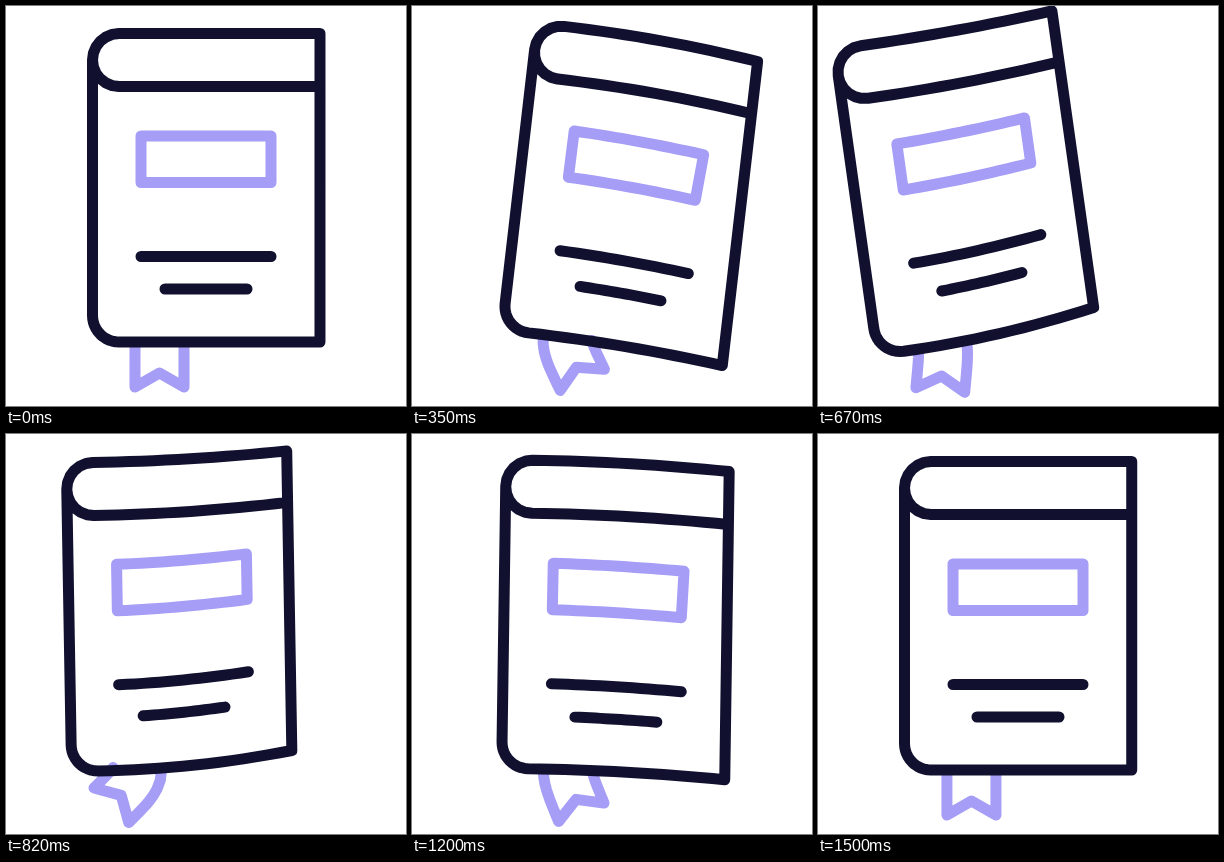
An HTML page for the animation above (1.52 s loop, 400 by 400 pixels).

```html
<!DOCTYPE html>
<html lang="en">
<head>
<meta charset="utf-8">
<title>Swinging book</title>
<style>
  html, body { margin: 0; width: 100%; height: 100%; overflow: hidden; background: #fff; }
  svg { display: block; width: 100%; height: 100%; }
  path { fill: none; stroke-width: 11; stroke-linejoin: round; stroke-linecap: round; }
  .ink { stroke: #11112f; }
  .accent { stroke: #a59df6; }
  #ribbon { stroke-linecap: butt; }
</style>
</head>
<body>
<svg viewBox="0 0 400 400">
  <g id="book">
    <path id="ribbon" class="accent"/>
    <path id="label" class="accent"/>
    <path id="lines" class="ink"/>
    <path id="cover" class="ink"/>
  </g>
</svg>
<script>
const LOOP = 1520, REST = 1500;
const WIDTH = 201, RADIUS = 26.5, BOTTOM = 282;
const RIBBON_LENGTH = 45, RIBBON_HALF = 24.5;
const BEATS = [650, 1020, 1400];

// Eases from rest through one peak per beat and back; lag shifts every beat after the first push.
function swing(time, peaks, lag = 0) {
  const times = [0, 200, ...BEATS.map(beat => Math.min(beat + lag, REST)), REST];
  const values = [0, ...peaks, 0];
  const next = times.findIndex(t => t > time);
  if (next < 0) return 0;
  const u = (time - times[next - 1]) / (times[next] - times[next - 1]);
  return values[next - 1] + (values[next] - values[next - 1]) * (1 - Math.cos(Math.PI * u)) / 2;
}

const range = (n, f) => Array.from({ length: n + 1 }, (_, i) => f(i / n));
const across = (x0, x1, y) => range(16, u => [x0 + (x1 - x0) * u, y]);
const arc = (cy, from, to) => range(12, u => {
  const a = (from + (to - from) * u) * Math.PI / 180;
  return [RADIUS * Math.cos(a), cy + RADIUS * Math.sin(a)];
});
const toPath = points => 'M' + points.map(p => p.map(n => n.toFixed(2)).join(' ')).join('L');
const setPath = (id, d) => document.getElementById(id).setAttribute('d', d);

// Local origin is the centre of the upper rounded corner.
const coverPoints = [
  ...across(WIDTH, 0, RADIUS), ...arc(0, 90, 270),
  ...across(0, WIDTH, -RADIUS), ...across(WIDTH, 0, BOTTOM),
  ...arc(BOTTOM - RADIUS, 90, 180), [-RADIUS, 0]
];
const labelPoints = [...across(22, 152, 76), ...across(152, 22, 122.5)];
const textLines = [across(22, 152, 196.5), across(46, 128, 229)];

function draw(time) {
  const x = 200 + swing(time, [44.5, -50, 10, 0]);
  const y = 182 + swing(time, [11.5, -3, -.5, 0], -200);
  const angle = swing(time, [14.4, -9.4, 2.8, 0], -60);
  const bendTop = swing(time, [17, -9.5, 9.3, 0], 110);
  const bendBottom = swing(time, [16, -19, 9, 0], 110);
  const sway = swing(time, [.06, .82, -.8, .4], -200);
  const shrink = 7 * Math.sin(Math.PI * time / LOOP);

  const bendAt = y => bendTop + (bendBottom - bendTop) * (y + RADIUS) / (BOTTOM + RADIUS);
  const onCover = ([x, y]) => {
    const u = Math.max(0, x) / WIDTH;
    return [x - shrink * u, y + bendAt(y) * u * u];
  };
  const onPrint = ([x, y]) => [x, y + bendAt(y) * 1.25 * (x / WIDTH) ** 1.8];

  // The label's right side leans with a downward bend.
  const lean = Math.max(0, bendTop) * .0053;
  const onLabel = p => {
    const [x, y] = onPrint(p);
    return [x - lean * (p[1] - 99) * p[0] / 152, y];
  };

  // The ribbon curls along a spine that turns quickly near its root.
  const root = onCover([40.5, BOTTOM]);
  const curl = s => sway * (1 - (1 - s) ** 4);
  const ribbonPoint = (s, side) => {
    let [x, y] = root;
    const steps = 10, step = RIBBON_LENGTH * s / steps;
    for (let i = 0; i < steps; i++) {
      const a = curl(s * (i + .5) / steps);
      x += step * Math.sin(a);
      y += step * Math.cos(a);
    }
    const offset = RIBBON_HALF * side;
    return [x + offset * Math.cos(curl(s)), y - offset * Math.sin(curl(s))];
  };

  setPath('cover', toPath(coverPoints.map(onCover)));
  setPath('label', toPath(labelPoints.map(onLabel)) + 'Z');
  setPath('lines', textLines.map(line => toPath(line.map(onPrint))).join(''));
  setPath('ribbon', toPath([
    ...range(10, s => ribbonPoint(s, -1)),
    ribbonPoint(.69, 0),
    ...range(10, s => ribbonPoint(1 - s, 1))
  ]));
  document.getElementById('book').setAttribute('transform',
    `translate(${x} ${y}) rotate(${angle}) translate(-87 -128)`);
}

function tick() {
  draw(performance.now() % LOOP);
  requestAnimationFrame(tick);
}
tick();
</script>
</body>
</html>
```
